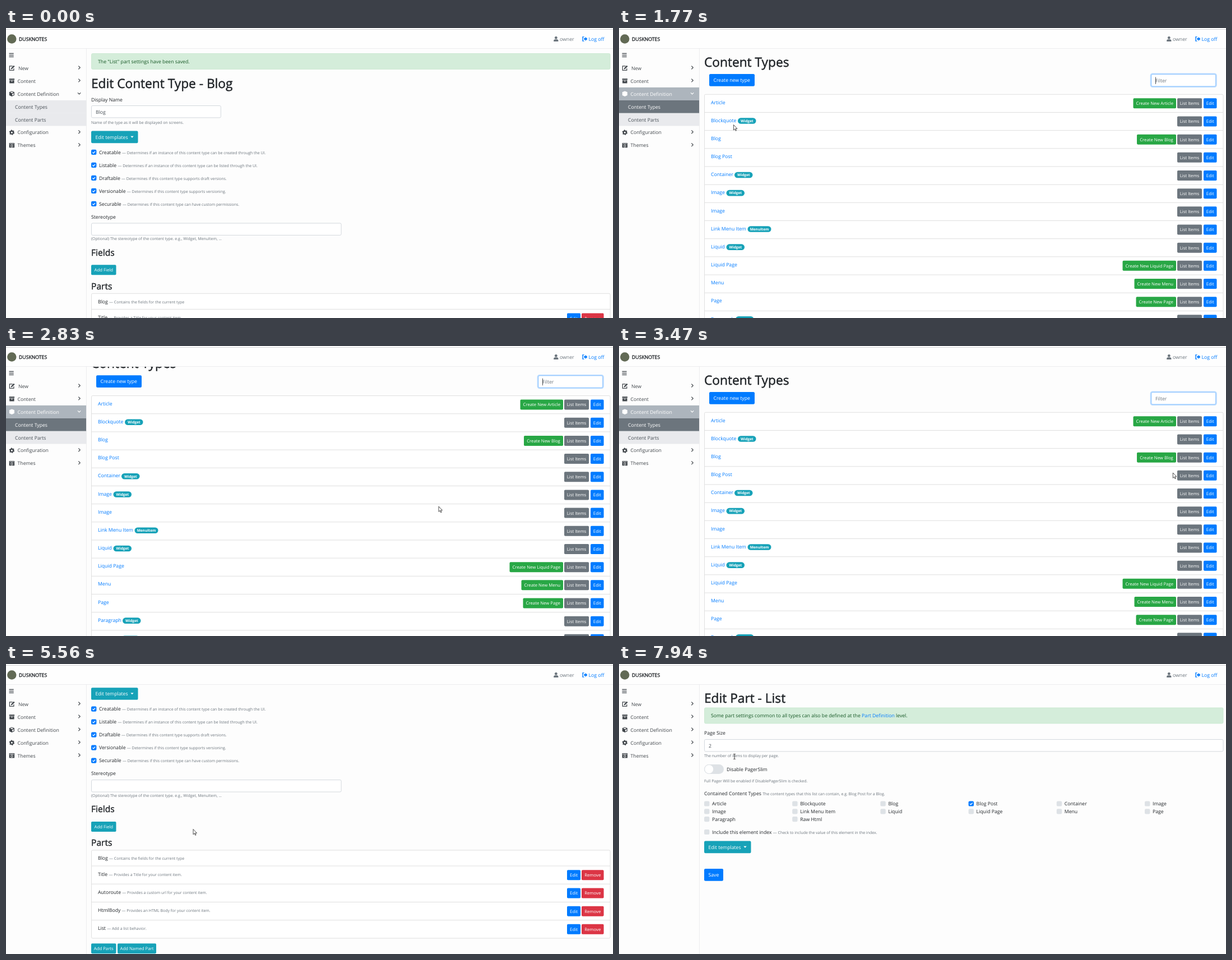
These frames come from a looping animation (1083 px wide and 517 px high, 7.99 s). An HTML page:

```html
<!DOCTYPE html>
<html lang="en">
<head>
<meta charset="utf-8">
<title>Content type walkthrough</title>
<style>
  html, body { margin: 0; width: 100%; height: 100%; overflow: hidden; background: #fdfdfd; }
  svg { display: block; width: 1083px; height: 517px; }
  text { font: 8.7px "Open Sans", "Noto Sans", sans-serif; fill: #212529; text-rendering: geometricPrecision; white-space: pre; }
  .s { font-size: 6.96px; fill: #6c757d; }
  .h1 { font-size: 22.7px; stroke: #212529; stroke-width: .5px; }
  .h3 { font-size: 15.6px; stroke: #212529; stroke-width: .4px; }
  .brand { stroke: #212529; stroke-width: .35px; }
  .in { fill: #495057; }
  .ph { fill: #6c757d; }
  .ok { fill: #155724; }
  .a { fill: #007bff; }
  .w { fill: #fff; }
  .b { font-size: 7.75px; fill: #fff; text-anchor: middle; }
  .badge { font-size: 6.5px; font-weight: 700; fill: #fff; text-anchor: middle; }
  .row { color: #41464b; }
  .row text { fill: currentColor; }
  .line { fill: none; stroke: currentColor; stroke-width: 1.2; }
</style>
</head>
<body>
<svg id="stage" viewBox="0 0 1083 517" xmlns="http://www.w3.org/2000/svg"></svg>
<script>
const LOOP = 7990;
const BLUE = '#007bff', TEAL = '#17a2b8', GRAY = '#6c757d', GREEN = '#28a745', RED = '#dc3545', DARK = '#495057';
const OVER = { [BLUE]: '#0069d9', [TEAL]: '#138496', [GRAY]: '#5a6268', [GREEN]: '#218838', [RED]: '#c82333' };

// Markup helpers
const text = (x, y, s, cls = '') => `<text x="${x}" y="${y}" class="${cls}">${s}</text>`;
const small = s => `<tspan class="s">${s}</tspan>`;
const rect = (x, y, w, h, fill, r = 0, extra = '') =>
  `<rect x="${x}" y="${y}" width="${w}" height="${h}" rx="${r}" fill="${fill}" ${extra}/>`;
const path = (d, extra = '') => `<path d="${d}" ${extra}/>`;
const hot = (x, y, w, h, fill, over, r = 0) =>
  rect(x, y, w, h, fill, r, `class="hot" data-base="${fill}" data-over="${over}"`);
const button = (x, right, cy, label, fill) =>
  hot(x, cy - 9, right - x, 18, fill, OVER[fill], 1.8) + text((x + right) / 2, cy + 2.9, label, 'b');
const bigButton = (x, y, w, label, fill, caret) =>
  hot(x, y, w, 21.7, fill, OVER[fill], 2.2) + text(x + 7.5, y + 14, label, 'w') +
  (caret ? path(`M${x + 70.3} ${y + 9.3}h5.4l-2.7 2.9z`, 'fill="#fff"') : '');
const input = (x, y, w, value = '') =>
  rect(x + .5, y + .5, w - 1, 21.4, '#fff', 2.2, 'stroke="#ced4da" stroke-width=".9"') + text(160, y + 15.3, value, 'in');
const check = (x, cy, on) => rect(x, cy - 4.6, 9.4, 9.2, on ? BLUE : '#dee2e6', 2.2) +
  (on ? path(`M${x + 2.4} ${cy + .1}l1.7 1.7 3-3.3`, 'fill="none" stroke="#fff" stroke-width="1.3"') : '');
const alertBox = (y, s) => rect(152.5, y + .5, 925.5, 28, '#d4edda', 2.2, 'stroke="#c3e6cb" stroke-width=".7"') +
  text(164, y + 17.8, s, 'ok');
const frame = (y, h) => rect(152.5, y, 925.5, h, '#fff', 2.2, 'stroke="#dfdfdf"');
const rule = y => path(`M152.5 ${y}H1078`, 'stroke="#dfdfdf"');

// Content type editor
function typeEditor() {
  const flags = [
    ['Creatable', 'if an instance of this content type can be created through the UI.'],
    ['Listable', 'if an instance of this content type can be listed through the UI.'],
    ['Draftable', 'if this content type supports draft versions.'],
    ['Versionable', 'if this content type supports versioning.'],
    ['Securable', 'if this content type can have custom permissions.']];
  const parts = [
    ['Title', 'Provides a Title for your content item.'],
    ['Autoroute', 'Provides a custom url for your content item.'],
    ['HtmlBody', 'Provides an HTML Body for your content item.'],
    ['List', 'Add a list behavior.']];
  return text(152, 68.5, 'Edit Content Type - Blog', 'h1') +
    text(152, 92.5, 'Display Name') + input(152, 100, 231.8, 'Blog') +
    text(152, 132.6, 'Name of the type as it will be displayed on screens.', 's') +
    bigButton(152, 145.5, 83.5, 'Edit templates', TEAL, true) +
    flags.map(([name, hint], i) => check(152, 183.4 + i * 23, true) +
      text(166, 186.7 + i * 23, `${name} ${small('— Determines ' + hint)}`)).join('') +
    text(152, 301.8, 'Stereotype') + input(152, 309.5, 446.6) +
    text(152, 340.2, '(Optional) The stereotype of the content type. e.g., Widget, MenuItem, ...', 's') +
    text(152, 367.8, 'Fields', 'h3') + button(152, 196.5, 393.3, 'Add Field', TEAL) +
    text(152, 427.6, 'Parts', 'h3') + frame(435.3, 157) +
    text(164, 452.8, `Blog ${small('— Contains the fields for the current type')}`) +
    parts.map(([name, hint], i) => {
      const y = 463.4 + i * 32.2;
      return rule(y) + text(164, y + 17.6, `${name} ${small('— ' + hint)}`) +
        button(1001, 1025, y + 16.2, 'Edit', BLUE) + button(1027, 1066.5, y + 16.2, 'Remove', RED);
    }).join('') +
    button(152, 196.5, 610.5, 'Add Parts', TEAL) + button(199, 268, 610.5, 'Add Named Part', TEAL);
}

// Content type list: name, badge x, badge label, left edge of the create button
function typeList() {
  const rows = [
    ['Article', 0, '', 917.5], ['Blockquote', 212, 'Widget'], ['Blog', 0, '', 924], ['Blog Post'],
    ['Container', 206, 'Widget'], ['Image', 191.5, 'Widget'], ['Image'], ['Link Menu Item', 229.5, 'MenuItem'],
    ['Liquid', 191.5, 'Widget'], ['Liquid Page', 0, '', 898.5], ['Menu', 0, '', 919.5], ['Page', 0, '', 922.5],
    ['Paragraph', 208, 'Widget'], ['Raw Html', 206, 'Widget']];
  return text(152, 68.5, 'Content Types', 'h1') +
    bigButton(161, 82, 81, 'Create new type', BLUE) +
    rect(948.8, 81.8, 116.8, 23, '#fff', 3, 'stroke="#bfdeff" stroke-width="2.4"') +
    rect(949.8, 82.6, 114.8, 21.4, '#fff', 2.2, 'stroke="#80bdff" stroke-width=".9"') +
    text(957, 97, 'Filter', 'ph') + rect(957, 87.5, .8, 12.5, '#212529', 0, 'id="caret"') +
    frame(118.3, 450) +
    rows.map(([name, bx, badge, cx], i) => {
      const y = 118.3 + i * 32.17, w = badge === 'MenuItem' ? 42 : 32.5;
      return (i ? rule(y) : '') + text(164, y + 17.2, name, 'a') +
        (bx ? rect(bx, y + 9.7, w, 10.6, TEAL, 5.3) + text(bx + w / 2, y + 17.3, badge, 'badge') : '') +
        (cx ? button(cx, 994, y + 16, 'Create New ' + name, GREEN) : '') +
        button(996, 1040, y + 16, 'List Items', GRAY) + button(1043, 1066.5, y + 16, 'Edit', BLUE);
    }).join('');
}

// List part editor
function partEditor() {
  const names = ['Article', 'Blockquote', 'Blog', 'Blog Post', 'Container', 'Image', 'Image', 'Link Menu Item',
    'Liquid', 'Liquid Page', 'Menu', 'Page', 'Paragraph', 'Raw Html'];
  return text(152, 68.5, 'Edit Part - List', 'h1') +
    alertBox(77.5, 'Some part settings common to all types can also be defined at the <tspan class="a">Part Definition</tspan> level.') +
    text(152, 125.8, 'Page Size') + input(152, 134, 926.5, '2') +
    text(152, 166, 'The number of items to display per page.', 's') +
    rect(152, 179, 35, 17, '#dee2e6', 8.5) +
    '<circle cx="160.7" cy="187.5" r="8" fill="#fff" stroke="#dee2e6"/>' +
    text(192, 190.8, 'Disable PagerSlim') +
    text(152, 211, 'Full Pager Will be enabled if DisablePagerSlim is checked.', 's') +
    text(152, 234, `Contained Content Types ${small('The content types that this list can contain, e.g. Blog Post for a Blog.')}`) +
    names.map((name, i) => {
      const x = 152 + i % 6 * 157.2, y = 249 + Math.floor(i / 6) * 13.8;
      return check(x, y, i === 3) + text(x + 14, y + 3.2, name);
    }).join('') +
    check(152, 299.5) +
    text(166, 302.8, `Include this element index ${small('— Check to include the value of this element in the index.')}`) +
    bigButton(152, 315.5, 83.5, 'Edit templates', TEAL, true) + bigButton(152, 365, 34, 'Save', BLUE);
}

// Sidebar icons, centred on 0,0
const icons = {
  New: path('M1.5-3.5H-4V4H3.5V.5', 'class="line"') + path('M-1.6 2l.4-2L3.4-4.6 5.2-2.8.4 1.6z', 'fill="currentColor"'),
  Content: path('M-4.7-4.2H4.7v2.4H-4.7zM-4.2-1.2H4.2V4.2H-4.2zM-1.5 0v1h3V0z', 'fill="currentColor" fill-rule="evenodd"'),
  'Content Definition': path('M0-4.8L4.5-3V2.6L0 4.8-4.5 2.6V-3z', 'fill="currentColor"') +
    path('M-2.9-2.6L0-3.7 2.9-2.6 0-1.4zM.8 0L3.3-1V2L.8 3.2z', 'fill="#fff"'),
  Configuration: '<circle r="2.6" fill="none" stroke="currentColor" stroke-width="2.2"/>' +
    '<circle r="4.1" fill="none" stroke="currentColor" stroke-width="1.2" stroke-dasharray="2.15"/>',
  Themes: path('M-4.7-4.2H4.7V4.2H-4.7zM-3.7-2.9v.9h7.4v-.9z', 'fill="currentColor" fill-rule="evenodd"') +
    '<circle cy="1.2" r="1.8" fill="none" stroke="#fff" stroke-width=".9"/>'
};

function sidebar({ open, active, bare }) {
  let y = 60;
  const row = (label, x, bg, color, inner = '') => {
    const s = `<g class="row" style="color:${color}" data-color="${color}">` +
      hot(0, y, 143, 22.95, bg, '#4b5057') + text(x, y + 14.7, label) + inner + '</g>';
    y += 22.95;
    return s;
  };
  let out = bare ? '' : path('M5.5 45.3h8.2M5.5 48.3h8.2M5.5 51.3h8.2', 'stroke="#343a40" stroke-width="1.2"');
  for (const name of Object.keys(icons)) {
    const def = name === 'Content Definition', lit = def && active;
    const arrow = def && open ? 'M128 115.3l2.6 2.6 2.6-2.6' : `M129.3 ${y + 7.7}l2.9 2.9-2.9 2.9`;
    const deco = bare ? '' : `<g transform="translate(10.4 ${y + 11.4})">${icons[name]}</g>` +
      path(arrow, `class="line${name === 'Configuration' ? ' gear' : ''}"`);
    out += row(name, bare ? 11.5 : name === 'New' ? 22 : 20.5, lit ? '#adb5bd' : '#fdfdfd', lit ? '#fff' : '#41464b', deco);
    if (def && open) {
      out += row('Content Types', 16, active ? GRAY : '#e9eaed', active ? '#fff' : DARK) +
        row('Content Parts', 16, '#e9eaed', DARK);
    }
  }
  return out;
}

const group = (id, body) => `<g id="${id}">${body}</g>`;
const $ = id => document.getElementById(id);

$('stage').innerHTML =
  rect(0, 0, 1083, 517, '#fdfdfd') +
  group('saved', alertBox(45, 'The "List" part settings have been saved.') + `<g transform="translate(0 38)">${typeEditor()}</g>`) +
  group('types', typeList()) + group('editor', typeEditor()) + group('part', partEditor()) +
  rect(0, 0, 1083, 36.5, '#fefefe') +
  path('M0 2.5H1083', 'stroke="#d3d3d6"') + path('M0 36.5H1083M143.5 37V517', 'stroke="#ececee"') +
  '<circle cx="10.3" cy="19.5" r="8.2" fill="#626a55"/>' + text(23, 22.5, 'DUSKNOTES', 'brand') +
  text(988, 22.8, 'owner', 'ph') + text(1039.5, 22.8, 'Log off', 'a') +
  group('headIcons',
    `<circle cx="981.3" cy="17.4" r="2.4" fill="${GRAY}"/>` +
    path('M977.2 24v-1.3q0-2.4 2.6-2.4h3q2.6 0 2.6 2.4V24z', `fill="${GRAY}"`) +
    path('M1031.5 15.8h-2.6v7.4h2.6', `fill="none" stroke="${BLUE}" stroke-width="1.3"`) +
    path('M1031 18.3h2.6v-2.5l3.8 3.7-3.8 3.7v-2.5H1031z', `fill="${BLUE}"`)) +
  group('sideOpen', sidebar({ open: true })) + group('sideActive', sidebar({ open: true, active: true })) +
  group('sideBare', sidebar({ bare: true })) + group('sideClosed', sidebar({})) +
  group('cursor',
    group('arrow', path('M0 0V9.4L2.2 7.4 3.7 10.8 5.1 10.2 3.6 6.9H6.5z', 'fill="#fff" stroke="#222" stroke-width=".8"')) +
    group('hand', path('M-1 1Q0-.7 1 1V4.6L4.8 5.4Q6 5.8 5.8 7.4L4.8 12.6H-.6L-3.6 8.4Q-3.8 6.8-2.3 7.4L-1 8.6z',
      'fill="#fff" stroke="#222" stroke-width=".8"')) +
    group('beam', path('M-1.8-4.5H-.4L0-4 .4-4.5H1.8M0-4V4M-1.8 4.5H-.4L0 4 .4 4.5H1.8', 'fill="none" stroke="#222" stroke-width=".9"')));

const hots = {};
for (const id of ['saved', 'types', 'editor', 'part', 'sideOpen', 'sideActive', 'sideBare', 'sideClosed']) {
  const shift = id === 'saved' ? 38 : 0;
  hots[id] = [...$(id).querySelectorAll('.hot')].map(el => {
    const [x, y, w, h] = ['x', 'y', 'width', 'height'].map(k => +el.getAttribute(k));
    return { el, x, y: y + shift, w, h, row: el.closest('.row') };
  });
}
const gearArrow = document.querySelector('#sideOpen .gear');

// Cursor stops: time, x, y
const stops = [
  [160, 986, 510], [740, 122, 243], [910, 60, 178], [960, 57, 164.5], [1390, 45, 141], [1540, 45, 141],
  [2310, 783, 287], [2500, 783, 287], [2830, 772, 286], [3140, 946, 243], [3910, 1053, 200], [4220, 1053, 200],
  [4520, 1019.5, 216], [4670, 1013, 221], [4850, 1013, 221], [5400, 334, 294.5], [5560, 334, 294.5],
  [5710, 339, 296], [5820, 339, 296], [6630, 1031, 466], [6770, 1013, 466], [7050, 1013, 466],
  [7690, 246, 250], [7790, 246, 250], [7940, 206, 165]];

const ease = (t, a, b) => {
  const u = Math.min(1, Math.max(0, (t - a) / (b - a)));
  return u * u * (3 - 2 * u);
};

function cursorAt(t) {
  const i = stops.findIndex(s => s[0] > t);
  if (i < 0) return stops[stops.length - 1].slice(1);
  if (i === 0) return stops[0].slice(1);
  const [a, ax, ay] = stops[i - 1], [b, bx, by] = stops[i], u = ease(t, a, b);
  return [ax + (bx - ax) * u, ay + (by - ay) * u];
}

const show = (id, on) => $(id).style.display = on ? '' : 'none';

function draw(t) {
  const page = t < 1540 ? 'saved' : t < 4420 ? 'types' : t < 7100 ? 'editor' : 'part';
  const side = t < 1540 ? 'sideOpen' : t < 4420 ? 'sideActive' : t < 4570 ? 'sideBare' : 'sideClosed';
  const scroll = page === 'types' ? 60 * (ease(t, 2360, 2660) - ease(t, 2680, 2980))
    : page === 'editor' ? 106.5 * ease(t, 5220, 5600) : 0;
  const [x, y] = cursorAt(t), visible = t >= 160;
  let hover = false;

  for (const id in hots) {
    const on = id === page || id === side;
    show(id, on);
    if (!on) continue;
    const py = id === page ? y + scroll : y;
    for (const { el, x: hx, y: hy, w, h, row } of hots[id]) {
      const over = visible && x >= hx && x < hx + w && py >= hy && py < hy + h;
      el.setAttribute('fill', over ? el.dataset.over : el.dataset.base);
      if (row) row.style.color = over ? '#fff' : row.dataset.color;
      hover = hover || over;
    }
  }
  $(page).setAttribute('transform', `translate(0 ${-scroll})`);
  show('headIcons', side !== 'sideBare');
  show('caret', (t - 1690 + 1060 * 2) % 1060 < 530);
  gearArrow.style.display = t >= 880 && t < 1010 ? 'none' : '';

  const beam = t >= 7890;
  show('cursor', visible);
  show('beam', beam);
  show('hand', hover && !beam);
  show('arrow', !hover && !beam);
  $('cursor').setAttribute('transform', `translate(${x} ${y})`);
}

const start = performance.now();
function tick() {
  draw((performance.now() - start) % LOOP);
  requestAnimationFrame(tick);
}
tick();
</script>
</body>
</html>
```
